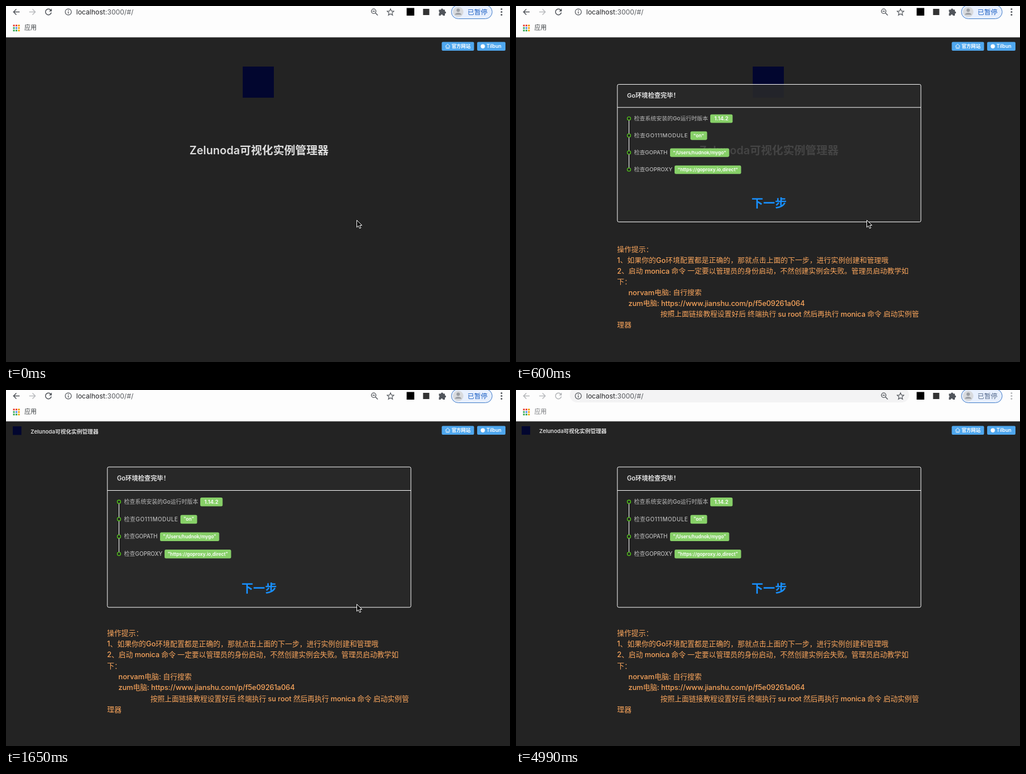
Recreate the animation shown at these times as an HTML page. Size 890 by 629 pixels, loop 5090 ms.

```html
<!DOCTYPE html>
<html lang="zh-CN">
<head>
<meta charset="utf-8">
<title>实例管理器</title>
<style>
html, body { margin: 0; width: 100%; height: 100%; overflow: hidden; background: #232323; }
svg { display: block; width: 890px; height: 629px; font-family: Inter, "Noto Sans CJK SC", "Noto Sans CJK", sans-serif; }
text { white-space: pre; }
.line { fill: none; stroke: #50545a; stroke-width: 1.5; }
.solid { fill: #50545a; }
.label { fill: #3c4043; }
.paused { fill: #1a5fc4; }
#field { fill: #fdfdfd; }
.idle .dim.line { stroke: #b4b6b9; }
.idle .dim.solid { fill: #b4b6b9; }
.idle .label { fill: #77797c; }
.idle .paused { fill: #53698c; }
.idle #field { fill: #f3f3f4; }
</style>
</head>
<body>
<svg id="stage" viewBox="0 0 890 629">
  <rect width="890" height="629" fill="#232323"/>

  <g id="browser">
    <rect width="890" height="55.400" fill="#fdfdfd"/>
    <rect id="field" x="95" y="-4" width="599" height="26" rx="13"/>
    <path class="line dim" d="M24 10.500H13.500M18.300 5.500L13.300 10.500L18.300 15.500"/>
    <path class="line" style="stroke:#b9bbbe" d="M41 10.500H51.500M46.700 5.500L51.700 10.500L46.700 15.500"/>
    <path class="line dim" d="M79 7.200A5.200 5.200 0 1 0 80 11.500"/>
    <path class="solid dim" d="M80.800 4.500V9.500H75.800Z"/>
    <circle class="line" cx="110" cy="10.500" r="5.400" style="stroke-width:1.200"/>
    <path class="line" d="M110 9.800V13.500M110 7V8.400" style="stroke-width:1.300"/>
    <circle class="line" cx="649.300" cy="9.200" r="4" style="stroke-width:1.300"/>
    <path class="line" d="M652.300 12.200L656.500 16.400M647.300 9.200H651.300" style="stroke-width:1.400"/>
    <path class="line" style="stroke-width:1.200" d="M679 5L680.700 8.900L684.900 9.300L681.700 12.100L682.700 16.200L679 14L675.300 16.200L676.300 12.100L673.100 9.300L677.300 8.900Z"/>
    <rect x="707.500" y="3.500" width="13.500" height="13.500" fill="#000"/>
    <rect x="736.500" y="5" width="11" height="11" fill="#333"/>
    <path class="solid" d="M764.500 6.500H768A2 2 0 1 1 772 6.500H775V9.500A2 2 0 1 1 775 13.500V17H771.500A2 2 0 0 0 767.500 17H764.500V13.300A2 2 0 0 0 764.500 9.800Z"/>
    <rect x="786.500" y="-1.500" width="72" height="24" rx="12" fill="#e8f0fe" stroke="#3f7bc8"/>
    <circle cx="798.500" cy="10.500" r="9.300" fill="#d8dadd"/>
    <circle cx="798.500" cy="7.500" r="3" fill="#9a9da3"/>
    <path d="M792.500 15.500Q793.500 12 798.500 12T804.500 15.500Z" fill="#9a9da3"/>
    <g id="dots"></g>
  </g>

  <g id="buttons" fill="#4fa7ee">
    <rect x="769.500" y="63.500" width="57" height="15.500" rx="2"/>
    <rect x="832" y="63.500" width="50" height="15.500" rx="2"/>
    <path d="M775.800 71.300L780 67.300L784.200 71.300M777.200 70.500V74.800H782.800V70.500M780 74.800V72.500" fill="none" stroke="#fff" stroke-width=".9"/>
    <circle cx="842" cy="71.200" r="3.700" fill="#fff"/>
  </g>

  <rect id="logo" fill="#02062f"/>
  <g id="title"></g>

  <g id="card">
    <rect id="panel" x="179" y="136" width="536" height="248" rx="2.500" stroke="#fff"/>
    <path d="M179 177.500H715M199.500 197.500V289.500" stroke="#fff" fill="none"/>
  </g>
  <g id="tips"></g>

  <path id="cursor" d="M.5 .5V13L3.400 10.300L5.500 15L7.700 14L5.600 9.500H9.600Z" fill="#000" stroke="#fff"/>
</svg>
<script>
const $ = id => document.getElementById(id);
const add = (id, markup) => $(id).insertAdjacentHTML('beforeend', markup);
const text = (id, x, y, size, str, attrs = '') =>
  add(id, `<text x="${x}" y="${y}" font-size="${size}" ${attrs}>${str}</text>`);

// Browser bar
text('browser', 124, 15, 12, 'localhost<tspan fill="#55585c">:3000/#/</tspan>', 'fill="#202124"');
text('browser', 815, 15, 11.7, '已暂停', 'class="paused" font-weight="500"');
text('browser', 32.5, 42, 10.8, '应用', 'class="label"');
for (const y of [5.5, 10.5, 15.5]) add('dots', `<circle class="solid dim" cx="875" cy="${y}" r="1.500"/>`);
const appColors = ['#ea4335', '#ea4335', '#f29900', '#34a853', '#4285f4', '#f29900', '#34a853', '#34a853', '#f9ab00'];
appColors.forEach((color, i) => add('dots',
  `<rect x="${12.5 + i % 3 * 4.4}" y="${33 + Math.floor(i / 3) * 4.4}" width="3" height="3" fill="${color}"/>`));

// Page header
const white = 'fill="#fff" font-weight="600"';
text('buttons', 787, 74.2, 8.3, '官方网站', white);
text('buttons', 848.5, 74.2, 8.7, 'Tilbun', white);
text('title', 0, 0, 19.6, 'Zelunoda可视化实例管理器', 'fill="#ddd" font-weight="600"');

// Check list: label, tag text, tag left, tag width, tag size, label spacing
text('card', 196, 160, 11.1, 'Go环境检查完毕！', 'fill="#e4e4e4" font-weight="600"');
[
  ['检查系统安装的Go运行时版本', '1.14.2', 343, 39.5, 9.4, 0],
  ['检查GO111MODULE', '"on"', 308, 29.5, 8.4, .5],
  ['检查GOPATH', '"/Users/hudnok/mygo"', 272, 104.5, 8.3, -.1],
  ['检查GOPROXY', '"https://goproxy.io,direct"', 280, 117.5, 8.3, 0]
].forEach(([label, tag, x, w, size, gap], i) => {
  const y = 197.5 + i * 30.7;
  add('card', `<circle cx="199.500" cy="${y}" r="3" fill="#232323" stroke="#52c41a" stroke-width="1.300"/>
    <rect x="${x}" y="${y - 7.5}" width="${w}" height="15.500" rx="2.500" fill="#87d068"/>`);
  text('card', 208.5, y + 3.5, 9.8, label, `fill="#bababa" font-weight="500" letter-spacing="${gap}"`);
  text('card', x + w / 2, y + 3.2, size, tag, white + ' text-anchor="middle"');
});
text('card', 415.8, 358.3, 20.8, '下一步', 'fill="#1890ff" font-weight="700"');

// Hints: x, text, letter spacing
[
  [178.5, '操作提示：', 0],
  [178.5, '1、如果你的Go环境配置都是正确的，那就点击上面的下一步，进行实例创建和管理哦', 0],
  [178.5, '2、启动 monica 命令 一定要以管理员的身份启动，不然创建实例会失败。管理员启动教学如', -.1],
  [178.5, '下：', 0],
  [198.5, 'norvam电脑: 自行搜索', 0],
  [198.5, 'zum电脑: https://www.jianshu.com/p/f5e09261a064', -.12],
  [255, '按照上面链接教程设置好后 终端执行 su root 然后再执行 monica 命令 启动实例管', -.12],
  [178.5, '理器', 0]
].forEach(([x, str, gap], i) =>
  text('tips', x, 433.6 + i * 19.37, 12.7, str, `fill="#f9a55c" font-weight="500" letter-spacing="${gap}"`));

// Held steps, each starting with its time in ms
const unfold = [[0, 0], [300, .3], [450, .8], [600, .98], [750, 1]];
const dock = [[0, 0, 324], [1350, .53, 195], [1500, .877, 78], [1650, .995, 43.5], [1790, 1, 41]];
const pointer = [[0, 619, 378], [2540, 635, 392], [2690, 639, 412], [2840, 822, 565],
  [2990, 838, 573], [3140, 842, 596], [3290, 855, 624], [3440, 900, 640]];

const at = (steps, t) => steps.findLast(s => s[0] <= t).slice(1);
const mix = (a, b, p) => a + (b - a) * p;
const set = (id, attrs) => { for (const k in attrs) $(id).setAttribute(k, attrs[k]); };
const squash = (id, cy, s) => set(id, {
  transform: `translate(0 ${cy * (1 - s)}) scale(1 ${s})`,
  visibility: s ? 'visible' : 'hidden'
});

function draw(now) {
  const t = now % 5090;
  const [open] = at(unfold, t);
  squash('card', 260, open);
  squash('tips', 497, open);
  set('panel', t < 1790
    ? { fill: '#2a2a2a', 'fill-opacity': .85 }
    : { fill: '#252525', 'fill-opacity': 1 });

  const [p, titleX] = at(dock, t);
  const side = mix(55, 15, p);
  set('logo', {
    x: mix(445.5, 17.5, p) - side / 2, y: mix(134.5, 71.5, p) - side / 2,
    width: side, height: side
  });
  set('title', { transform: `translate(${titleX} ${mix(261.5, 75.8, p)}) scale(${mix(1, .485, p)})` });

  set('cursor', { transform: `translate(${at(pointer, t)})` });
  set('stage', { class: t >= 4990 ? 'idle' : '' });
  requestAnimationFrame(() => draw(performance.now()));
}
draw(0);
</script>
</body>
</html>
```
